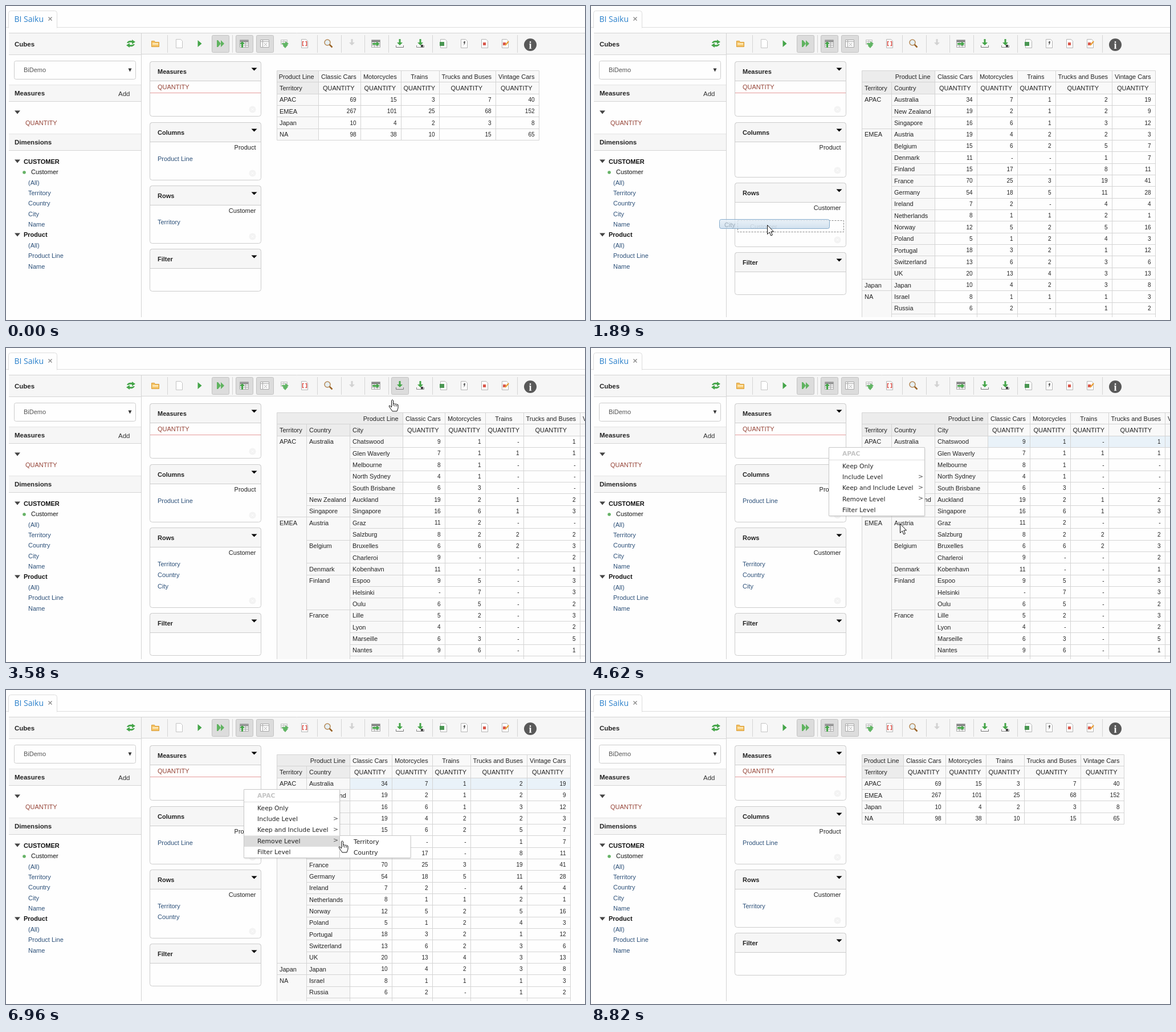
An HTML page with a canvas for the animation above (10000 ms loop, 1016 by 551 pixels).

```html
<!DOCTYPE html>
<html lang="en">
<head>
<meta charset="utf-8">
<title>Pivot table levels</title>
<style>
html, body { margin: 0; width: 100%; height: 100%; overflow: hidden; background: #fefefe; }
canvas { display: block; }
</style>
</head>
<body>
<canvas id="stage" width="1016" height="551"></canvas>
<script>
const g = document.getElementById('stage').getContext('2d');
const LOOP = 10000, BG = '#fefefe', HEAD = '#f6f6f6', EDGE = '#ccc', LINK = '#2b4f78', RED = '#954336', GREEN = '#45a549';
const SANS = '"Liberation Sans", Arial, sans-serif', MENU = '10.75px "DejaVu Sans", sans-serif';
const PLAIN = '11px ' + SANS, BOLD = 'bold 11px ' + SANS, TITLE = 'bold 11.5px ' + SANS, SMALL = '10px ' + SANS;
const ROW = 20.33, TOP = 113.5, LEFT = 475.5, BOTTOM = 546;

const LEVELS = ['Territory', 'Country', 'City'];
const LINES = ['Classic Cars', 'Motorcycles', 'Trains', 'Trucks and Buses', 'Vintage Cars'];
const VALUE_WIDTHS = [74, 71, 67, 99, 76];
const HEAD_WIDTHS = [[73], [52, 76], [52, 76, 93]];
const parse = s => s.split('\n').map(row => row.split(','));
const TABLES = [
`APAC,69,15,3,7,40
EMEA,267,101,25,68,152
Japan,10,4,2,3,8
NA,98,38,10,15,65`,
`APAC,Australia,34,7,1,2,19
,New Zealand,19,2,1,2,9
,Singapore,16,6,1,3,12
EMEA,Austria,19,4,2,2,3
,Belgium,15,6,2,5,7
,Denmark,11,-,-,1,7
,Finland,15,17,-,8,11
,France,70,25,3,19,41
,Germany,54,18,5,11,28
,Ireland,7,2,-,4,4
,Netherlands,8,1,1,2,1
,Norway,12,5,2,5,16
,Poland,5,1,2,4,3
,Portugal,18,3,2,1,12
,Switzerland,13,6,2,3,6
,UK,20,13,4,3,13
Japan,Japan,10,4,2,3,8
NA,Israel,8,1,1,1,3
,Russia,6,2,-,1,2
,USA`,
`APAC,Australia,Chatswood,9,1,-,1
,,Glen Waverly,7,1,1,1
,,Melbourne,8,1,-,-
,,North Sydney,4,1,-,-
,,South Brisbane,6,3,-,-
,New Zealand,Auckland,19,2,1,2
,Singapore,Singapore,16,6,1,3
EMEA,Austria,Graz,11,2,-,-
,,Salzburg,8,2,2,2
,Belgium,Bruxelles,6,6,2,3
,,Charleroi,9,-,-,2
,Denmark,Kobenhavn,11,-,-,1
,Finland,Espoo,9,5,-,3
,,Helsinki,-,7,-,3
,,Oulu,6,5,-,2
,France,Lille,5,2,-,3
,,Lyon,4,-,-,2
,,Marseille,6,3,-,5
,,Nantes,9,6,-,1
,,Paris`].map(parse);

// Pointer path: time, x, y
const PATH = [
  [100, 215, 525], [300, 66, 346], [350, 66, 346], [700, 306, 382], [790, 309, 385], [930, 309, 385],
  [1200, 55, 368], [1500, 55, 368], [1890, 309, 384], [2340, 309, 384], [2520, 330, 455], [2800, 560, 400],
  [3100, 680, 180], [3250, 698, 42], [3340, 692, 62], [3410, 692, 62], [3580, 677, 90], [3650, 627, 153],
  [3790, 627, 153], [4050, 500, 166], [4170, 500, 166], [4450, 500, 240], [4650, 545, 312], [4790, 546, 268],
  [4820, 546, 268], [5030, 600, 283], [5240, 600, 283], [5340, 600, 300], [5510, 600, 300], [5580, 580, 246],
  [5860, 500, 166], [6340, 500, 166], [6700, 500, 262], [6960, 589, 264], [7100, 638, 291], [7200, 637, 286],
  [8130, 637, 286], [8180, 634, 282], [8240, 637, 286], [8680, 637, 286], [8820, 269, 486]];
const DRAGS = [[320, 930, 'Country'], [1510, 2030, 'City']];
const QUERIES = [[930, 1240], [2030, 2060], [5510, 5580], [7410, 7480]];
const MENUS = [[4080, 5510], [6070, 7410]];
const during = (list, t) => list.find(([from, to]) => t >= from && t < to);

function pointer(t) {
  const i = PATH.findIndex(p => p[0] > t);
  if (i < 1) return null;
  const [a, b] = [PATH[i - 1], PATH[i]], u = (t - a[0]) / (b[0] - a[0]), k = u * u * (3 - 2 * u);
  return { x: a[1] + (b[1] - a[1]) * k, y: a[2] + (b[2] - a[2]) * k };
}

function text(s, x, y, color = '#222', font = PLAIN, align = 'left') {
  g.font = font; g.fillStyle = color; g.textAlign = align;
  g.fillText(s, x, y);
}
function box(x, y, w, h, fill, stroke, r = 0) {
  g.beginPath(); g.roundRect(x, y, w, h, r);
  if (fill) { g.fillStyle = fill; g.fill(); }
  if (stroke) { g.strokeStyle = stroke; g.lineWidth = 1; g.stroke(); }
}
function line(x1, y1, x2, y2, color = '#d4d4d4') {
  g.beginPath(); g.moveTo(x1, y1); g.lineTo(x2, y2);
  g.strokeStyle = color; g.lineWidth = 1; g.stroke();
}
function shape(d, x, y, fill, stroke, width = 1) {
  const p = new Path2D(d);
  g.save(); g.translate(x, y); g.lineWidth = width;
  if (fill) { g.fillStyle = fill; g.fill(p); }
  if (stroke) { g.strokeStyle = stroke; g.stroke(p); }
  g.restore();
}
function disc(x, y, r, fill) {
  g.beginPath(); g.arc(x, y, r, 0, 7); g.fillStyle = fill; g.fill();
}
function dashed(dash, ...args) {
  g.setLineDash(dash); box(...args); g.setLineDash([]);
}
const caret = (x, y, color, h = 6) => shape(`M0 0h10l-5 ${h}z`, x, y, color);

const GRID = 'M.5 1.5h15v13h-15zM.5 5.5h15M.5 8.5h15M.5 11.5h15M5.5 1.5v13M10.5 1.5v13';
const PAGE = 'M2.5 .5h8l3 3v12h-11z', DOWN = 'M6.5 0h3v6h3.5l-5 5-5-5h3.5z', TRAY = 'M1.5 11v3.5h13V11';
const SWAP = 'M1 7q2-5 9-4V1l6 4-6 4V6q-5-1-6 1zM15 9q-2 5-9 4v2l-6-4 6-4v3q5 1 6-1z';
const sheet = [PAGE, '#fff', '#b4b4b4'];
// Toolbar icons: centre x, then [path, fill, stroke, width] layers
const ICONS = [
  [262, ['M1.5 3.5h5l1 2h7v8h-13z', '#f5c468', '#d99c35'], ['M3 8.5h10', 0, '#fff3d0', 2]],
  [304, [PAGE, '#fff', '#c4c4c4']],
  [340, ['M4.5 2l7 6-7 6z', GREEN]],
  [376, ['M2 2h2v12H2zM4 2l5 6-5 6zM9 2l6 6-6 6z', '#5fb35f']],
  [418, [GRID, '#f8f8f8', '#a8a8a8'], ['M1 2h14v3H1z', '#999'], ['M4.5 4l4.5 5H6v6H3V9H0z', GREEN]],
  [454, ['M.5 1.5h15v13h-15zM.5 4.5h15M4.5 1.5v13', '#fafafa', '#a8a8a8'], ['M7 7l5 5m0-5l-5 5', 0, '#b0b0b0']],
  [489, ['M1.5 1.5h11v8h-11zM1.5 4.5h11M6.5 1.5v8', '#f2f2f2', '#c4c4c4'], ['M2 7h7V4l6 4-4 3H6zM6 10h8l-5 6-4-4z', '#62b565']],
  [524, sheet, ['M6.5 4.5h-2v7h2M9.5 4.5h2v7h-2', 0, '#d94b43', 1.5]],
  [566, ['M9.5 9.5l5 5', 0, '#9a6428', 2.5], ['M11 6a5 5 0 1 0-10 0a5 5 0 1 0 10 0', '#e6eff5', '#b58a58', 1.5]],
  [607, [DOWN, '#d2d2d2']],
  [649, [GRID, '#fff', '#a8a8a8'], ['M1 2h14v3H1z', '#888'], ['M2 7h7V4.5l6 4-6 4V10H2z', GREEN]],
  [691, [DOWN, GREEN], [TRAY, 0, '#777']],
  [727, [DOWN, GREEN], [TRAY, 0, '#888'], ['M9 10h4v4H9z', '#444']],
  [768, sheet, ['M1 5h8v7H1z', '#4a9652']],
  [804, sheet, ['M10 4a2.2 2.2 0 1 0-2 4q0 2-2 3q4-1 4-7z', '#666']],
  [840, sheet, ['M5 6h5v5H5z', '#d8584c']],
  [876, sheet, ['M4 6h5v5H4z', '#d8584c'], ['M8 11l6-7', 0, '#e9a23b', 2.5]]];

function toolbar(hover) {
  box(238, 48, 778, 36.5, HEAD);
  line(5, 47.5, 1016, 47.5);
  line(238, 84.5, 1016, 84.5);
  for (const x of [283.5, 397.5, 546.5, 588.5, 629.5, 671.5, 748.5, 897.5]) line(x, 51, x, 82);
  for (const [x, ...layers] of ICONS) {
    if ([376, 418, 454].includes(x) || (hover && x === 691)) box(x - 14.5, 51.5, 30, 30, '#dcdcdc', '#c2c2c2', 2);
    for (const [d, fill, stroke, width] of layers) shape(d, x - 8, 58, fill, stroke, width);
  }
  disc(920, 68, 11, '#595959');
  text('i', 920, 75, '#fff', 'bold 18px "Liberation Serif", serif', 'center');
}

function header(label, y, h) {
  box(5, y, 232, h, HEAD);
  line(5, y + h, 237, y + h);
  text(label, 15, y + h / 2 + 4.3, '#222', TITLE);
}

function sidebar() {
  header('Cubes', 47.5, 38);
  shape(SWAP, 211, 58, GREEN);
  box(14.5, 96.5, 213, 32, BG, EDGE, 3);
  text('BiDemo', 31, 116, '#555');
  shape('M0 0h6l-3 6z', 214.5, 109.5, '#333');
  line(5, 138.5, 237, 138.5);
  header('Measures', 138.5, 29);
  text('Add', 197, 157.5, '#333', '11.5px ' + SANS);
  caret(15, 183.5, '#444');
  text('QUANTITY', 34, 209, RED);
  line(5, 224.5, 237, 224.5);
  header('Dimensions', 224.5, 29);
  caret(15, 269.5, '#444');
  text('CUSTOMER', 31, 276.5, '#111', BOLD);
  disc(32, 292, 2.8, '#66b266');
  text('Customer', 44, 295, '#111');
  ['(All)', ...LEVELS, 'Name'].forEach((s, i) => text(s, 39, 313.5 + 18.35 * i, LINK));
  caret(15, 398.5, '#444');
  text('Product', 31, 405, '#111', BOLD);
  ['(All)', 'Product Line', 'Name'].forEach((s, i) => text(s, 39, 424 + 18.35 * i, LINK));
  line(237.5, 48, 237.5, BOTTOM);
}

function panel(title, y, h, hierarchy, levels = []) {
  box(252.5, y, 195, h, BG, EDGE, 4);
  box(252.5, y, 195, 34, HEAD, EDGE, [4, 4, 0, 0]);
  text(title, 266, y + 21, '#222', BOLD);
  caret(430.5, y + 11, '#000', 5);
  if (title !== 'Filter') {
    disc(432.5, y + h - 12, 6, '#f3f3f3');
    shape('M-2 -2l4 4m0-4l-4 4', 432.5, y + h - 12, 0, '#fff');
  }
  if (hierarchy) text(hierarchy, 438.5, y + 47.5, '#222', PLAIN, 'right');
  levels.forEach((s, i) => text(s, 266, y + 67.5 + 19.33 * i, LINK));
}

function panels(depth, dragging, over) {
  panel('Measures', 97.5, 96);
  text('QUANTITY', 266, 146, RED);
  line(253, 152.5, 447, 152.5, '#e59a9a');
  const heightOf = n => Math.round(81.67 + 19.33 * n);
  const colH = dragging ? 96 : heightOf(1), rowY = 204.5 + colH + 10;
  const rowH = dragging ? (over ? 112 : 96) : heightOf(depth);
  panel('Columns', 204.5, colH, 'Product', dragging ? [] : ['Product Line']);
  panel('Rows', rowY, rowH, 'Customer', dragging ? [] : LEVELS.slice(0, depth));
  panel('Filter', rowY + rowH + 10, 74);
  if (over) {
    dashed([3, 2], 257.5, rowY + 66, 186, 20, null, '#888');
    text('Customer', 279, rowY + 80.5, '#999');
  }
}

function table(depth, hoverRow) {
  const rows = TABLES[depth - 1], widths = [...HEAD_WIDTHS[depth - 1], ...VALUE_WIDTHS];
  const xs = widths.reduce((list, w) => [...list, list.at(-1) + w], [LEFT]);
  const yOf = r => Math.round(TOP - .5 + ROW * r) + .5;
  const first = xs[depth], right = xs.at(-1), end = yOf(rows.length + 2);
  const baseline = r => TOP + ROW * r + 14.3;
  box(LEFT, TOP, right - LEFT, yOf(2) - TOP, '#f9f9f9');
  box(LEFT, TOP, first - LEFT, yOf(2) - TOP, '#ececec');
  box(LEFT, yOf(2), first - LEFT, end - yOf(2), '#f8f8f8');
  if (hoverRow >= 2 && hoverRow < rows.length + 2) box(first, yOf(hoverRow), right - first, ROW, '#e9f2f9');
  line(LEFT, TOP, right, TOP);
  line(LEFT, yOf(1), right, yOf(1));
  text('Product Line', first - 8, baseline(0), '#222', PLAIN, 'right');
  LEVELS.slice(0, depth).forEach((s, i) => text(s, xs[i] + 4.5, baseline(1)));
  LINES.forEach((s, i) => {
    const mid = (xs[depth + i] + xs[depth + i + 1]) / 2 - 1.7;
    text(s, mid, baseline(0), '#222', PLAIN, 'center');
    text('QUANTITY', mid, baseline(1), '#222', PLAIN, 'center');
  });
  rows.forEach((cells, i) => {
    const r = i + 2, y = yOf(r);
    widths.forEach((w, c) => {
      const s = cells[c];
      if (c >= depth || s) line(xs[c], y, xs[c + 1], y);
      if (s) c < depth ? text(s, xs[c] + 4.5, baseline(r)) : text(s, xs[c + 1] - 8, baseline(r) - .5, '#222', SMALL, 'right');
    });
  });
  line(LEFT, end, right, end);
  xs.forEach((x, i) => line(x, i && i < depth ? yOf(1) : TOP, x, end));
}

function running(x, y, t) {
  g.save(); g.translate(x, y); g.rotate((t - 1200) * .006);
  for (let i = 0; i < 2; i++) {
    shape('M-5.5 -1a5.5 5.5 0 0 1 9.5 -3', 0, 0, null, '#444', 2);
    shape('M6.5 -6.5v5.5h-5.5z', 0, 0, '#444');
    g.rotate(Math.PI);
  }
  g.restore();
  let tx = x + 15.5;
  for (const [s, color] of [['Running query... [ ', '#111'], ['Cancel', '#00d'], [' ]', '#111']]) {
    text(s, tx, y + 4, color);
    tx += g.measureText(s).width;
  }
}

function raised(x, y, w, h, r) {
  g.save(); g.shadowColor = 'rgba(0,0,0,.2)'; g.shadowBlur = 3; g.shadowOffsetY = 1;
  box(x, y, w, h, '#fff', null, r);
  g.restore();
  box(x, y, w, h, '#fff', '#c8c8c8', r);
}

function busy(t, start) {
  g.globalAlpha = Math.min(.5, (t - start + 20) / 300);
  box(5, 48, 1011, 498, '#fff');
  g.globalAlpha = 1;
  raised(740.5, 436.5, 290, 70, 3);
  disc(776, 471.5, 16, '#b3282d');
  running(818.5, 464, t);
}

function menu(t, start, depth, p) {
  const inSub = p.x > 586, item = inSub ? 3 : Math.floor((p.y - 197) / 19.5);
  const slide = Math.min(1, (t - start) / 100);
  g.save();
  g.beginPath(); g.rect(410, 170, 310, 4 + 150 * slide); g.clip();
  raised(417.5, 174.5, 168, 120);
  text('APAC', 441, 189, '#c4c4c4', 'bold ' + MENU);
  line(418, 196.5, 585, 196.5, '#ddd');
  ['Keep Only', 'Include Level', 'Keep and Include Level', 'Remove Level', 'Filter Level'].forEach((s, i) => {
    if (i === item) box(418, 197 + 19.5 * i, 167, 19.5, '#dcdcdc');
    text(s, 441, 210.7 + 19.33 * i, '#222', MENU);
    if (i % 4) text('>', 574, 209.2 + 19.33 * i, '#555', MENU);
  });
  if (item >= 1 && item <= 3) {
    const y = Math.floor(197 + 19.5 * item) + .5;
    raised(585.5, y, 124.5, Math.round(19.5 * depth));
    LEVELS.slice(0, depth).forEach((s, i) => {
      if (p.x > 592 && Math.floor((p.y - y) / 19.5) === i) box(586, y + 19.5 * i, 123.5, 19.5, '#dcdcdc');
      text(s, 610, y + 14.3 + 19.5 * i, '#222', MENU);
    });
  }
  g.restore();
}

function ghost(label, p) {
  g.save();
  g.beginPath(); g.rect(5, 48, 1011, 498); g.clip();
  g.globalAlpha = .8;
  const x = Math.round(p.x - 84) + .5, y = Math.round(p.y - 10) + .5, fill = g.createLinearGradient(0, y, 0, y + 17);
  fill.addColorStop(0, '#e6eff7'); fill.addColorStop(1, '#c6d9ea');
  box(x, y, 193, 16, fill, '#6f9cc2', 3);
  text(label, x + 8.5, y + 13.5, '#8b9cab');
  g.restore();
}

function cursor({ x, y }, hand) {
  x = Math.round(x) + .5; y = Math.round(y) + .5;
  if (hand) {
    shape('M0 1.5q1.5-2.5 3 0v6q2-1 3 .5q2-1 3 .5q2-.5 2.5 1v5.5l-2 5.5H1.5l-5.5-8q-1-2.5 1-2l3 3z', x - 1, y, '#fff', '#111');
    shape('M3 8v3M6 9v3M9 9.5v2.5', x - 1, y, 0, '#111');
  } else shape('M0 0v16l3.7-3.5 2.6 6 2.6-1.2-2.6-5.8H11z', x, y, '#fff', '#111');
}

function draw() {
  const t = performance.now() % LOOP, p = pointer(t);
  const depth = t < 930 ? 1 : t < 2030 ? 2 : t < 5510 ? 3 : t < 7410 ? 2 : 1;
  const query = during(QUERIES, t), drag = during(DRAGS, t), open = during(MENUS, t);
  const hover = p && p.y < 95, over = drag && p.x > 253;

  box(0, 0, 1016, 551, BG);
  line(0, 37.5, 1016, 37.5, '#ddd');
  box(4.5, 8.5, 85, 30, BG, '#ddd', [4, 4, 0, 0]);
  box(5, 37, 84, 3, BG);
  text('BI Saiku', 14.5, 28, '#2a80cb', '14px "Open Sans", sans-serif');
  shape('M0 0l6 6m0-6l-6 6', 74.5, 19.5, 0, '#888', 1.3);

  g.save();
  g.beginPath(); g.rect(0, 40, 1016, BOTTOM - 40); g.clip();
  sidebar();
  toolbar(hover);
  panels(depth, drag, over);
  if (query) {
    dashed([2, 2], LEFT, 99.5, 560, 46, null, '#bbb');
    running(498.5, 123, t);
    busy(t, query[0]);
  } else {
    const inTable = p && p.x > LEFT && p.y > TOP;
    table(depth, open ? 2 : inTable ? Math.floor((p.y - TOP) / ROW) : -1);
  }
  if (open) menu(t, open[0], depth, p);
  g.restore();

  if (drag) ghost(drag[2], p);
  if (p) cursor(p, hover || (open && p.y > 197 && (p.y < 295 || p.x > 586)));
  requestAnimationFrame(draw);
}
draw();
</script>
</body>
</html>
```
